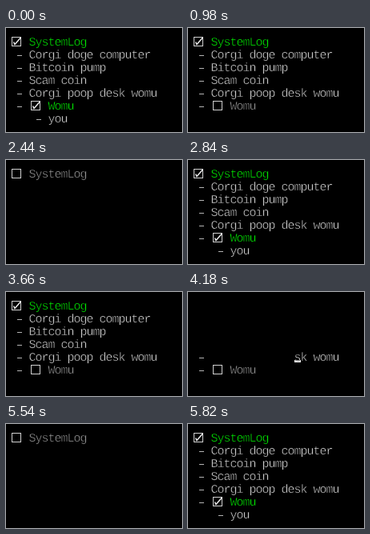
Animation, 220 px wide and 130 px high, one loop 6400 ms. Source, as an HTML page:

```html
<!DOCTYPE html>
<html lang="en">
<head>
<meta charset="utf-8">
<title>Log tree</title>
<style>
  html, body { margin: 0; width: 100%; height: 100%; overflow: hidden; background: #000; }
  svg { display: block; width: 220px; height: 130px; }
  /* the black outline thins the letters */
  text {
    font: 15px "Liberation Mono", "DejaVu Sans Mono", monospace;
    letter-spacing: -1px;
    text-rendering: geometricPrecision;
    white-space: pre;
    stroke: #000;
    stroke-width: 0.4px;
  }
</style>
</head>
<body>
<svg id="stage" viewBox="0 0 220 130"></svg>
<script>
const LOOP = 6400;
const CELL = 8, ROW = 16, LEFT = 5, BASE = 22;
const GREEN = '#00f000', TEXT = '#d4d4d4', DIM = '#989898';
const LINE = '#b4b4b4', FRAME = '#d0d0d0', WHITE = '#f0f0f0';

// [start in ms, state]
const steps = [
  [0, 'open'], [980, 'folded'], [1340, 'open'], [1680, 'folded'],
  [1840, 'open'], [2440, 'shut'], [2840, 'open'], [3660, 'folded'],
  [4180, 'wipe'], [4220, 'shut'], [4420, 'folded'], [4940, 'open'],
  [5540, 'shut'], [5820, 'open']
];

const stage = document.getElementById('stage');

function add(parent, tag, attrs, content) {
  const el = document.createElementNS('http://www.w3.org/2000/svg', tag);
  for (const key in attrs) el.setAttribute(key, attrs[key]);
  if (content) el.textContent = content;
  return parent.appendChild(el);
}

// A group that is visible only in the given states
function layer(...states) {
  const g = add(stage, 'g', {});
  const frames = steps.map(([at, state]) => ({
    offset: at / LOOP,
    opacity: states.includes(state) ? 1 : 0,
    easing: 'step-end'
  }));
  frames.push({ ...frames[frames.length - 1], offset: 1 });
  g.animate(frames, { duration: LOOP, iterations: Infinity });
  return g;
}

const colX = col => LEFT + col * CELL;

function label(g, col, row, str, fill) {
  add(g, 'text', { x: colX(col) - 0.5, y: BASE + row * ROW, fill }, str);
}

function dash(g, col, row) {
  add(g, 'rect', { x: colX(col) + 1, y: 18 + row * ROW, width: 6, height: 1, fill: LINE });
}

function box(g, col, row, checked) {
  const x = colX(col) + 2, y = 11 + row * ROW;
  add(g, 'rect', {
    x: x + 0.5, y: y + 0.5, width: 11, height: 11, fill: 'none', stroke: FRAME
  });
  if (checked) {
    add(g, 'path', {
      d: `M${x + 2.5} ${y + 6.5}l1.5 3l7.5 -8.5`,
      fill: 'none', stroke: WHITE, 'stroke-width': 1.5
    });
  }
}

const items = ['Corgi doge computer', 'Bitcoin pump', 'Scam coin', 'Corgi poop desk womu'];

const tree = layer('open', 'folded');
box(tree, 0, 0, true);
label(tree, 3, 0, 'SystemLog', GREEN);
items.forEach((item, i) => {
  dash(tree, 1, i + 1);
  label(tree, 3, i + 1, item, TEXT);
});
dash(tree, 1, 5);

const child = layer('open');
box(child, 3, 5, true);
label(child, 6, 5, 'Womu', GREEN);
dash(child, 4, 6);
label(child, 6, 6, 'you', TEXT);

const closedChild = layer('folded', 'wipe');
box(closedChild, 3, 5, false);
label(closedChild, 6, 5, 'Womu', DIM);

const closedRoot = layer('shut');
box(closedRoot, 0, 0, false);
label(closedRoot, 3, 0, 'SystemLog', DIM);

// Half-erased screen with the terminal cursor
const wipe = layer('wipe');
dash(wipe, 1, 4);
dash(wipe, 1, 5);
add(wipe, 'rect', { x: colX(16), y: 85, width: CELL, height: 3, fill: WHITE });
label(wipe, 16, 4, items[3].slice(13), TEXT);
</script>
</body>
</html>
```
